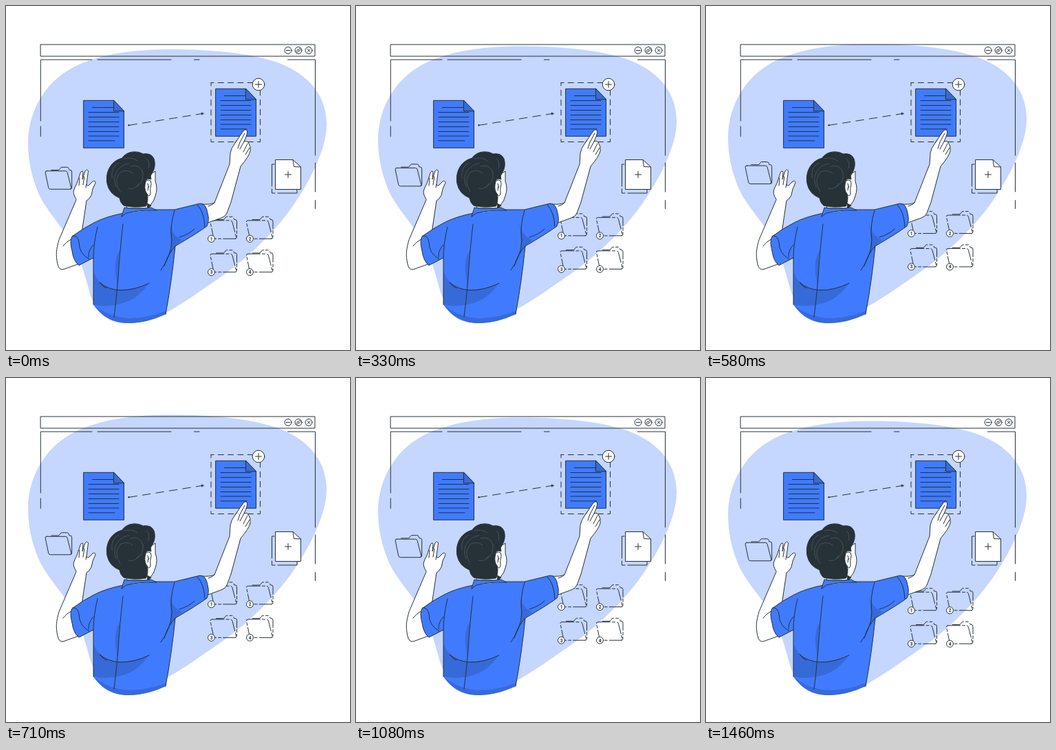
Recreate the animation shown at these times as an HTML page. Size 500 px wide and 500 px high, loop 1500 ms.

```html
<!DOCTYPE html>
<html lang="en">
<head>
<meta charset="utf-8">
<style>
  html, body { margin: 0; width: 100%; height: 100%; overflow: hidden; background: #fff; }
  svg { display: block; width: 100%; height: 100%; fill: none; stroke: #263238; stroke-linecap: round; stroke-linejoin: round; }
  .paper { fill: #fff; }
  .blue { fill: #407bff; }
  .shade { fill: #376ad9; stroke: none; }
  .ink { fill: #263238; }
  .dashed { stroke-dasharray: 18 3 4 3; }
  text { font: bold 6.5px Roboto, sans-serif; fill: #263238; stroke: none; text-anchor: middle; }
</style>
</head>
<body>
<svg viewBox="0 0 500 500">
  <defs>
    <g id="doc">
      <path class="blue" d="M0 0H43.5L58.5 15.5V69H0Z"/>
      <path class="shade" d="M43.5 0V15.5H58.5Z"/>
      <path d="M43.5 0V15.5H58.5ZM12.500 10.200H43M7 17.200H51M7 24.200H51M7 31.200H51M7 38.200H51M7 45.200H51M7 51.700H51M7 58.500H45"/>
    </g>
    <g id="folder">
      <path d="M9 4.200H19Q21 4 21.700 2.300T24 0H32Q34 0 34.500 2L35.300 4.200H37Q39 4.200 39 7V29.500Q39 32 36.500 32"/>
      <path d="M2.500 5.500H29.500Q32 5.500 32.500 8L38 29.500Q38.500 32 36 32H8Q5.500 32 5 29.500L.5 8Q0 5.500 2.500 5.500Z"/>
    </g>
  </defs>

  <g class="float">
    <path fill="#c5d6ff" stroke="none" d="M240 63C300 63 352 69 385 79C432 93 466 124 466 172C466 206 444 250 422 283C396 324 350 368 309 396C284 413 258 432 236 444C220 453 202 461 178 461C150 461 130 444 122 418C115 392 110 374 100 352C86 325 60 300 48 274C37 248 32 224 32 198C33 150 59 106 106 85C145 68 192 63 240 63Z"/>
  </g>

  <g>
    <path d="M50.500 56H449V73H50.500ZM125 78H50.300V167M50.300 175V189.500M133 78H240M273.500 78H281M409.500 78H449.500V217M449.500 228V270M449.500 282.500V294.500"/>
    <circle cx="410" cy="64.500" r="5"/>
    <circle cx="425" cy="64.500" r="5"/>
    <circle cx="440" cy="64.500" r="5"/>
    <path d="M407.300 64.500H412.700M438 62.500L442 66.500M442 62.500L438 66.500"/>
    <path stroke-width=".9" d="M424.700 63.500L426 62.200Q427.300 61.300 428 62.500T427.200 64.600L426 65.500Q424.800 66 424.400 65M425.300 65.500L424 66.800Q422.700 67.700 422 66.500T422.800 64.400L424 63.500Q425.200 63 425.600 64"/>
  </g>

  <use href="#doc" x="113" y="137.300"/>
  <use href="#doc" x="305" y="120.300"/>
  <rect x="298" y="111.500" width="71.500" height="86" stroke-dasharray="8 6.300" stroke-dashoffset="4"/>
  <circle class="paper" cx="367" cy="114" r="8.800"/>
  <path d="M362.500 114H371.500M367 109.500V118.500"/>
  <path stroke-dasharray="11.500 8.200" d="M179 173.300L285 156.500"/>
  <circle class="ink" cx="178.500" cy="173.300" r=".8"/>
  <path class="ink" stroke-width=".5" d="M287.500 156.200L284 154.800L284.500 158Z"/>

  <path d="M390 230H386.500V262M386.500 266V272H391M395 272H423V267"/>
  <path class="paper" d="M392 223.500H417L428.500 234V266.500H392Z"/>
  <path d="M417 223.500L418.500 233.500L428.500 234M405.500 245H414.500M410 240.500V249.500"/>

  <g class="float">
    <use href="#folder" x="56.700" y="234.300"/>
    <g id="grid"></g>
  </g>

  <!-- arms -->
  <path class="paper" d="M102 281Q97 273 98.500 268T103 258L108 243Q110 238 112 241L111 252L115 240Q118 236 119.500 240L117 259Q118 263 121 260L126 255Q130 253 130 257L126 266L124 275Q121 281 117 283L110 330L108 374L83 383Q77 384 75 375C72 361 73 354 77 340Z"/>
  <path d="M83 349Q88 342 97 338M107 250L106 261M114 248L112 260M117 259L116 264"/>
  <path class="paper" d="M284 288Q297 289 303 286L325 230L326 214Q327 207 333 199L344 183Q347 178 350.500 181Q351 185 349 190L346 197Q351 195 353 200Q356 204 355 211Q353 219 341 233L327 285L321 301Q319 306 313 308L288 317Z"/>
  <path d="M347 185L340 198L337 207M346 197L340 208M351 200L345 212M354 206L348 216M303 286Q299 290 294 291M333 199L336 195"/>

  <!-- shirt -->
  <path class="blue" stroke="none" d="M171 301Q145 306 128 315Q112 323 96 335Q92 342 96 356Q98 371 106 377L127 366V434C140 453 156 461 178 461C198 461 214 455 232 448Q241 400 246 349Q277 331 292 320Q296 311 293 301Q291 287 282 287L245 296L217 296Z"/>
  <path class="shade" d="M237 314Q240 333 256 340L246 349Q240 356 239 362Q241 340 237 314Z"/>
  <path class="shade" d="M127 386Q133 402 147 409Q168 418 207 404Q192 425 173 431Q149 439 127 434Z"/>
  <path class="shade" d="M165 355Q157 368 159 388L162 408Z"/>
  <path class="shade" d="M128 435Q150 452 178 454Q205 454 233 443L232 448Q205 461 178 461Q148 461 128 435Z"/>
  <path d="M171 301Q145 306 128 315Q112 323 96 335Q92 342 96 356Q98 371 106 377L127 366V434M232 448Q241 400 246 349Q277 331 292 320Q296 311 293 301Q291 287 282 287L245 296L217 296"/>
  <path d="M133 321Q127 346 127 367M170 317Q165 360 163 395Q160 430 157 452M136 402Q148 412 165 413Q185 414 208 403M137 402Q140 408 146 410M245 297Q238 319 241 341Q240 364 225 384M246 349Q235 360 230 378M278 289Q288 299 289 321M97 334Q104 333 106 343Q106 360 121 368M127 347Q119 356 120 365M252 336Q266 332 274 324"/>

  <!-- head -->
  <path class="paper" d="M211 244L217 240L217 255Q221 265 217 276Q215 284 211 288L207 294L176 294L174 286Z"/>
  <path class="ink" d="M203 291Q186 294 171 290Q166 286 165 279Q150 273 147 258C144 240 153 225 169 221C174 212 189 209 199 215Q211 213 215 222C218 231 215 239 212 243Q209 247 211 252Q202 248 202 261Q205 270 206 278Q206 287 203 291Z"/>
  <path class="paper" d="M210 254Q203 250 202 260Q201 268 205 273Q208 279 210 273Q209 265 211 259Z"/>
  <path d="M206 258Q208 262 206 268M208 262L206 265"/>
  <path class="ink" d="M205 287L211 290L206 294Z"/>
  <path stroke="#667177" stroke-width=".5" d="M154 250Q152 233 164 228M160 263Q154 248 163 238Q169 230 179 229M166 270Q155 253 167 241Q177 237 184 243M172 222Q183 219 191 225M181 233Q194 229 199 242M189 263Q201 257 199 242M178 265Q188 268 193 258M204 222Q210 227 207 236"/>
  <path class="blue" d="M168 306L172 293Q190 296 211 293L219 297Q195 296 175 301Z"/>
</svg>
<script>
  const PERIOD = 1500, LIFT = 10;

  document.getElementById('grid').innerHTML = [1, 2, 3, 4].map((n, i) => {
    const col = i % 2, row = i >> 1, badgeX = 298.5 + 56 * col, y = 306.3 + 48.5 * row;
    return `<use class="dashed" href="#folder" x="${296.5 + 52.5 * col}" y="${y}"/>
      <circle class="paper" cx="${badgeX}" cy="${y + 32}" r="5"/>
      <text x="${badgeX}" y="${y + 34.3}">${n}</text>`;
  }).join('');

  const floating = document.querySelectorAll('.float');

  function draw(now) {
    const phase = now % PERIOD / PERIOD;
    const y = -LIFT * (1 - Math.abs(1 - 2 * phase));
    for (const el of floating) el.setAttribute('transform', `translate(0 ${y})`);
    requestAnimationFrame(draw);
  }
  draw(performance.now());
</script>
</body>
</html>
```
